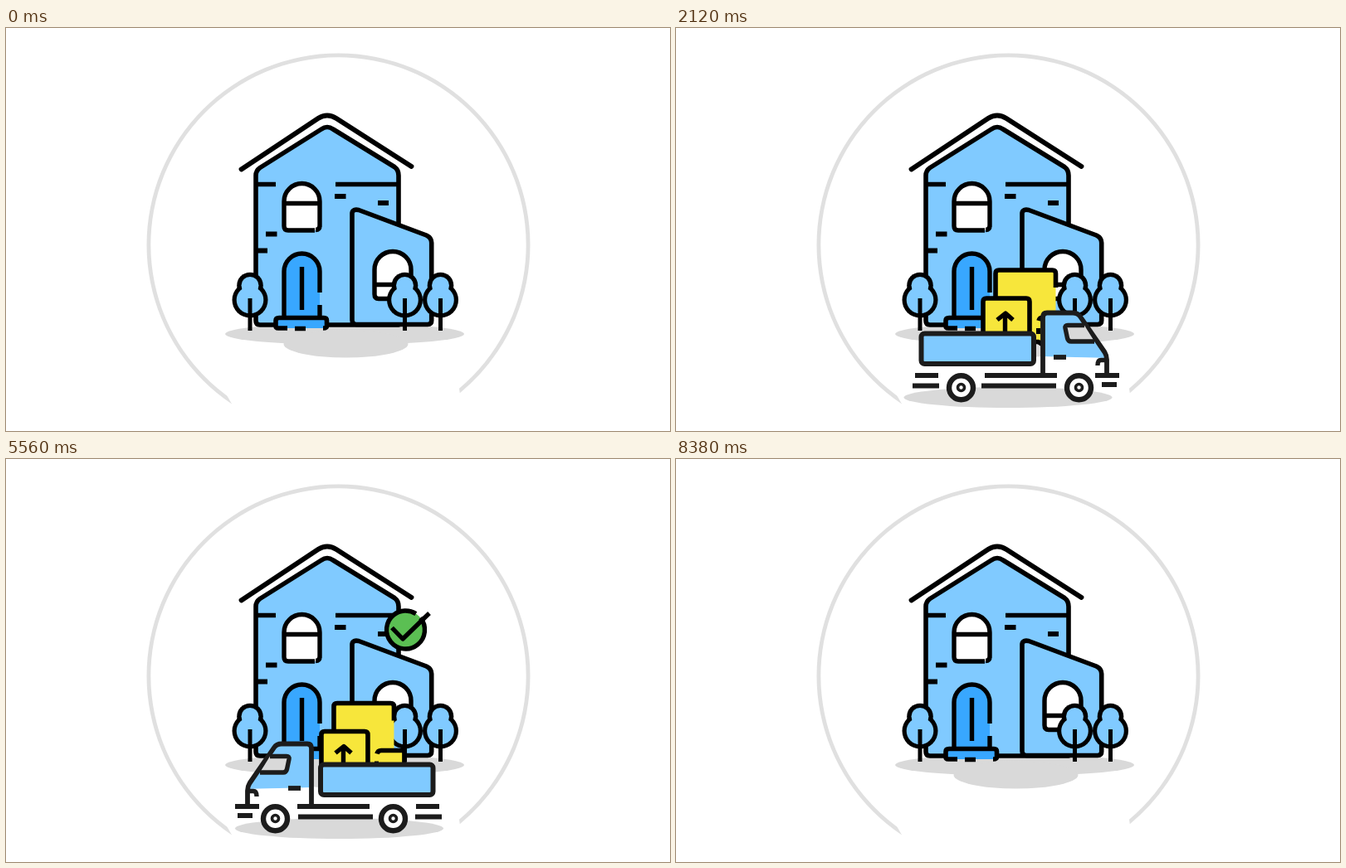
An HTML page with a canvas for the animation above (8.4 s loop, 800x486 px).

```html
<!DOCTYPE html>
<html lang="en">
<head>
<meta charset="utf-8">
<title>Moving day</title>
<style>
html, body { margin: 0; width: 100%; height: 100%; overflow: hidden; background: #fff; }
canvas { display: block; width: 800px; height: 486px; }
</style>
</head>
<body>
<canvas id="stage" width="800" height="486"></canvas>
<script>
const ctx = document.getElementById('stage').getContext('2d');
const LOOP = 8400, TRAVEL = 700, LAG = 35;
const BLUE = '#80caff', DOOR = '#38a7ff', YELLOW = '#f7e63b', GREEN = '#5bbf53';
const GREY = '#d9d9d9', INK = '#000', DARK = '#1c1c1c';

const span = (t, start, length) => Math.min(1, Math.max(0, (t - start) / length));
const smooth = u => u * u * (3 - 2 * u);
const quad = u => u < 0.5 ? 2 * u * u : 1 - 2 * (1 - u) ** 2;
const backOut = u => 1 + 2 * (u - 1) ** 3 + (u - 1) ** 2;

function path(d, fill, stroke, width = 5.4, cap = 'butt') {
  const p = new Path2D(d);
  if (fill) { ctx.fillStyle = fill; ctx.fill(p); }
  if (stroke) {
    ctx.strokeStyle = stroke;
    ctx.lineWidth = width;
    ctx.lineCap = cap;
    ctx.lineJoin = 'round';
    ctx.stroke(p);
  }
}

function oval(x, y, rx, ry, fill, stroke, width) {
  ctx.beginPath();
  ctx.ellipse(x, y, rx, ry, 0, 0, Math.PI * 2);
  if (fill) { ctx.fillStyle = fill; ctx.fill(); }
  if (stroke) { ctx.strokeStyle = stroke; ctx.lineWidth = width; ctx.stroke(); }
}

function box(x, y, w, h, r, fill, stroke, width = 5.4) {
  ctx.beginPath();
  ctx.roundRect(x, y, w, h, r);
  ctx.fillStyle = fill;
  ctx.fill();
  if (stroke) { ctx.strokeStyle = stroke; ctx.lineWidth = width; ctx.stroke(); }
}

function ring() {
  ctx.beginPath();
  ctx.arc(400.5, 261.5, 231, 2.16, 0.885 + Math.PI * 2);
  ctx.arc(400.5, 261.5, 226.2, 0.872 + Math.PI * 2, 2.205, true);
  ctx.closePath();
  ctx.fillStyle = '#e0e0e0';
  ctx.fill();
}

function tree(x) {
  oval(x, 310.5, 15.8, 15.8, INK);
  oval(x, 328, 21.5, 21.5, INK);
  oval(x, 310.5, 10.5, 10.5, BLUE);
  oval(x, 328, 16.3, 16.3, BLUE);
  path(`M${x} 326V365`, null, INK, 5);
}

function house() {
  oval(408, 369, 144, 13, GREY);
  oval(409.5, 381, 75, 16.5, GREY);
  path('M283.5 170.5L376 109Q387 102 398 109L488.5 167', null, INK, 5.8, 'round');
  path('M306 358Q301 358 301 353V178Q301 172 306 168.5L380 122Q387 117 394 122L468 167.5Q473 171 473 178V358Z',
    BLUE, INK, 5.6);
  path('M302 188.5H325M397 188.5H472', null, INK);
  path('M396 203H409.5M448 211H461M313 248.5H326.5M303 268.5H315', null, INK, 5.8);

  path('M335 209A21.5 21.5 0 0 1 378 209V239Q378 244 373 244H340Q335 244 335 239Z', '#fff');
  path('M378 240V209A21.5 21.5 0 0 0 335 209V239Q335 244 340 244H372M373 243.5Q378 243.5 378 238M336 211.5H377',
    null, INK);

  path('M335 349V293.5A21.5 21.5 0 0 1 378 293.5V349Z', DOOR);
  path('M335 349V293.5A21.5 21.5 0 0 1 378 293.5V319M378 334V349M356.5 288V340', null, INK);
  path('M417 223Q418 218 425 219.5L506.5 250Q512.7 253 512.7 259V353Q512.7 357.5 508 357.5H422Q417 357.5 417 352Z',
    BLUE, INK, 5.6);
  path('M444 291.5A22 22 0 0 1 488 291.5V321Q488 326.5 483 326.5H449Q444 326.5 444 321ZM444 309.5H488',
    '#fff', INK);

  box(325, 349.5, 61.5, 12.5, 3, DOOR);
  path('M339 362H328Q325 362 325 359V353Q325 349.5 329 349.5H383Q386.5 349.5 386.5 353V359Q386.5 362 382 362M348 362.5H361',
    null, INK, 5.6);
  [294, 480.5, 523.5].forEach(tree);
}

function parcels(dx, dy) {
  ctx.save();
  ctx.translate(dx, dy);
  box(385, 292, 72.5, 87, 4, YELLOW);
  path('M385 330V296Q385 292 389 292H453.5Q457.5 292 457.5 296V313M426 378.5H437', null, INK, 5.6);
  box(438, 349, 32, 32.5, 3, YELLOW);
  path('M437 353Q438 349 442 349H467Q470 349 470 352V378Q470 381.5 467 381.5H441L436 378', null, INK, 5.6);
  path('M436.5 362V369', null, INK, 5);
  box(370, 326, 56, 56, 4, YELLOW);
  path('M409 382H374Q370 382 370 378V330Q370 326 374 326H422Q426 326 426 330V378Q426 382 421 382', null, INK, 5.6);
  path('M387 352L397 344L406 352M396.5 345V367', null, INK);
  ctx.restore();
}

function wheel(x) {
  oval(x, 433.7, 14.5, 14.5, '#fff', DARK, 6.4);
  oval(x, 433.5, 4, 4, '#fff', DARK, 3.6);
}

// Drawn facing right; the flipped one mirrors about x = 405.
function truck(dx, flipped) {
  ctx.save();
  ctx.translate(dx, 0);
  if (flipped) { ctx.translate(810, 0); ctx.scale(-1, 1); }
  path('M442 397V348Q442 343.5 447 343.5H478Q484 343.5 487 348L517 392L519 398Z', BLUE);
  path('M442 396L519 398V418H442Z', '#fff');
  path('M442 419V349Q442 343.5 447 343.5H478Q484 343.5 487 348L516.5 391Q519 395 519 400V418', null, DARK, 5.8);
  path('M492 358.5H472Q468.5 358.5 469 362L471.5 374Q472.5 378 476 378H504Z', GREY);
  path('M492 358.5H472Q468.5 358.5 469 362L471.5 374Q472.5 378 476 378H504', null, DARK);
  path('M455 397H470', null, DARK, 5.8);
  path('M519 400.5H512Q508 400.5 508 407', null, DARK);
  box(295.5, 368.5, 135.5, 36.5, 4, BLUE, DARK, 6);
  path('M288 419H316M285 431.5H317M372 419H459M368 431.5H458M505 419H534M513 430H531', null, DARK, 5.8);
  wheel(343.5);
  wheel(485.5);
  ctx.restore();
}

function badge(size) {
  if (size <= 0) return;
  ctx.save();
  ctx.translate(455, 176);
  ctx.scale(size, size);
  ctx.translate(-455, -176);
  oval(481.5, 206, 23, 23, GREEN);
  ctx.beginPath();
  ctx.arc(481.5, 206, 23, -0.68, 5.28);
  ctx.strokeStyle = INK;
  ctx.lineWidth = 5.4;
  ctx.stroke();
  path('M465 203.5L478 217L510 186', null, INK);
  ctx.restore();
}

// A trip comes in from one side and leaves by the given direction.
const trips = [
  { enter: 505, leave: 3061, from: -1, to: 1 },
  { enter: 4020, leave: 6921, from: 1, to: -1 }
];

const shift = (trip, t) =>
  trip.from * TRAVEL * (1 - backOut(span(t, trip.enter, 460))) +
  trip.to * TRAVEL * (t < trip.leave ? 0 : ((t - trip.leave) / 340) ** 3);

function draw(t) {
  ctx.fillStyle = '#fff';
  ctx.fillRect(0, 0, 800, 486);
  ring();
  house();

  const unload = 1 - smooth(span(t, 1500, 400));
  const load = smooth(span(t, 5400, 400));
  const active = trips.map(trip => t > trip.enter && t < trip.leave + 480);

  trips.forEach((trip, i) => {
    if (active[i]) oval((i ? 401.5 : 400) + shift(trip, t - LAG), 445.5, 125.5, 12.5, GREY);
  });

  if (t > trips[0].enter && t < trips[1].leave + 480) {
    const ride = t < 1500 ? shift(trips[0], t) : t > 5800 ? shift(trips[1], t) : 0;
    parcels(ride - 54 * unload + 28 * load, 7 * (unload + load));
  }

  trips.forEach((trip, i) => {
    if (active[i]) truck(shift(trip, t), i === 1);
  });
  badge(quad(span(t, 3000, 480)) * (1 - quad(span(t, 6920, 480))));
}

const begin = performance.now();
function tick() {
  draw((performance.now() - begin) % LOOP);
  requestAnimationFrame(tick);
}
tick();
</script>
</body>
</html>
```
